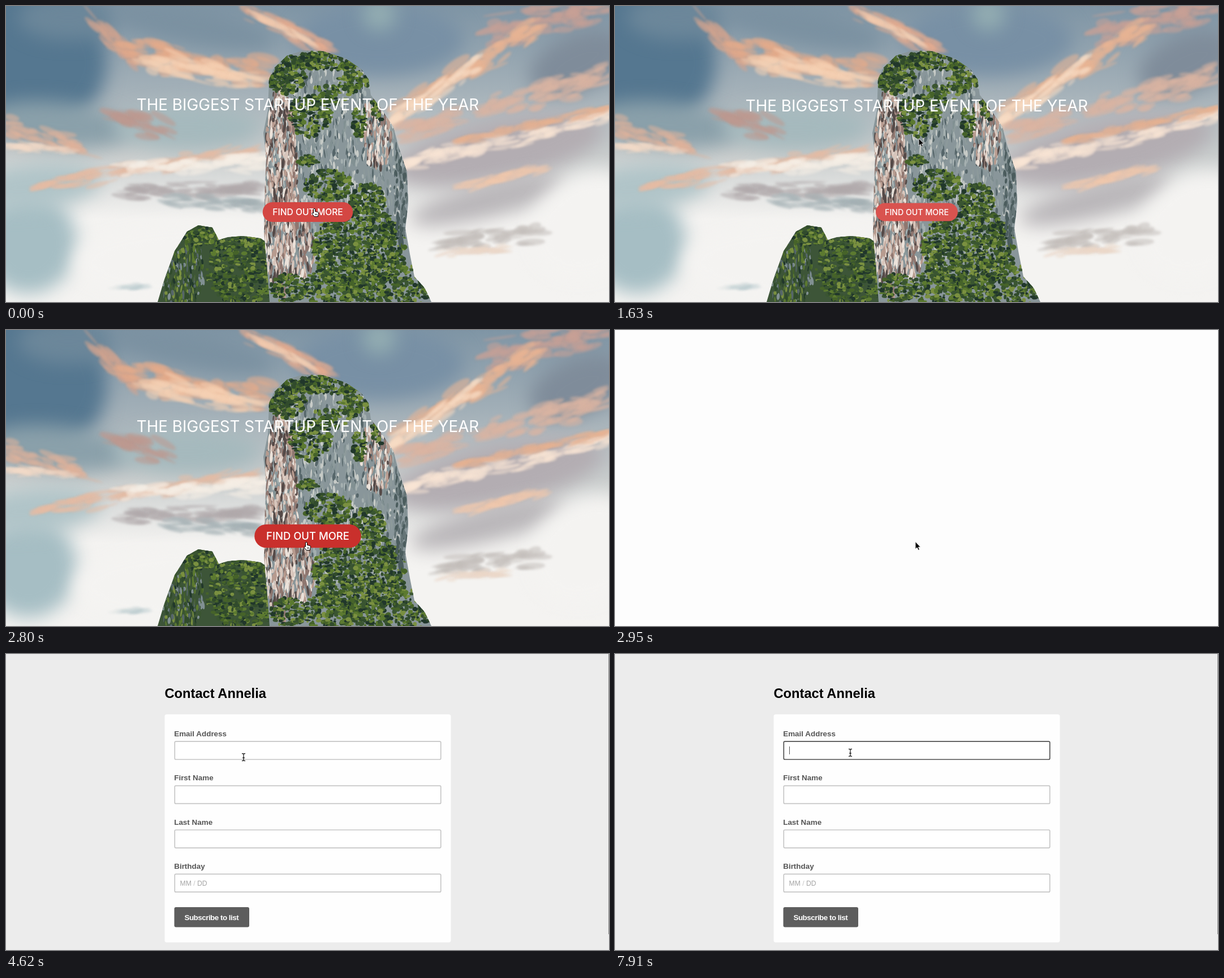
These frames come from a looping animation (1066x525 px, 8 s). An HTML page with a canvas:

```html
<!DOCTYPE html>
<html lang="en">
<head>
<meta charset="utf-8">
<title>Event sign-up</title>
<style>
  html, body { margin: 0; width: 100%; height: 100%; overflow: hidden; background: #fdfdfd; }
  canvas, svg { position: absolute; left: 0; top: 0; width: 1066px; height: 525px; }
  canvas { will-change: transform; }
  .hero { font-family: Inter, sans-serif; fill: #fff; text-anchor: middle; }
  .form { font-family: "Liberation Sans", Arial, sans-serif; }
  .label { font-size: 13.45px; font-weight: 700; fill: #555; }
  .input { fill: #fff; stroke: #c6c6c6; stroke-width: 1.7; }
  .input.focus { stroke: #505050; }
</style>
</head>
<body>
<canvas id="photo" width="1066" height="525"></canvas>
<svg viewBox="0 0 1066 525">
  <g id="hero" class="hero">
    <text id="title" x="533.5" y="186.5" font-size="27.8">THE BIGGEST STARTUP EVENT OF THE YEAR</text>
    <g id="button">
      <rect id="pill" x="-72.5" y="-16" width="145" height="32" rx="16"/>
      <text y="5" font-size="14.2" font-weight="500">FIND OUT MORE</text>
    </g>
  </g>
  <g id="form" class="form">
    <rect width="1066" height="525" fill="#ececec"/>
    <rect x="1065" width="1" height="497" fill="#858585"/>
    <text x="280.5" y="78" font-size="23.7" font-weight="700">Contact Annelia</text>
    <rect x="280.5" y="107" width="506" height="404.5" rx="4" fill="#fefefe"/>
    <g id="fields"></g>
    <text x="307.5" y="410.6" font-size="12.2" fill="#a5a5a5">MM <tspan fill="#c4c4c4">/</tspan> DD</text>
    <rect x="297.5" y="449" width="132.5" height="35.5" rx="3" fill="#5d5d5d"/>
    <text x="315.5" y="471.6" font-size="13.4" font-weight="700" letter-spacing="-.5" fill="#fff">Subscribe to list</text>
    <rect id="caret" x="308" y="164" width="1" height="14" fill="#555"/>
  </g>
  <g id="cursor">
    <path id="arrow" d="M0 0V13L3 10.3L5.2 15L7.3 14L5.2 9.6H9.2Z" fill="#000" stroke="#fff" stroke-width=".8"/>
    <path id="hand" d="M-1.5 8V1.3a1.5 1.5 0 0 1 3 0V5L6 6Q7.8 6.5 7.6 8.5L6.5 12V14H0L-3.6 9.5Q-4.4 7.6-3 7.2ZM2 9V11.5M4 9V11.5" fill="#fff" stroke="#000" stroke-width="1"/>
    <path id="beam" d="M-3-6.5Q0-6.5 0-5Q0-6.5 3-6.5M0-5V5M-3 6.5Q0 6.5 0 5Q0 6.5 3 6.5M-1.8 1H1.8" fill="none" stroke="#222" stroke-width="1.3"/>
  </g>
</svg>
<script>
const start = performance.now();
const LOOP = 8000;
const $ = id => document.getElementById(id);

// ---- Landscape ----
let seed = 41;
const rand = () => {
  seed = (seed + 0x6D2B79F5) | 0;
  let v = Math.imul(seed ^ (seed >>> 15), 1 | seed);
  v ^= v + Math.imul(v ^ (v >>> 7), 61 | v);
  return ((v ^ (v >>> 14)) >>> 0) / 4294967296;
};
const jitter = () => rand() + rand() - 1;
const pick = list => list[Math.floor(rand() * list.length)];
const ctx = $('photo').getContext('2d');

function oval(x, y, rx, ry, turn, color) {
  ctx.fillStyle = color;
  ctx.beginPath();
  ctx.ellipse(x, y, rx, ry, turn, 0, 2 * Math.PI);
  ctx.fill();
}

// Wispy ovals scattered along a line.
function wisp(x0, y0, x1, y1, spread, color) {
  const length = Math.hypot(x1 - x0, y1 - y0);
  const turn = Math.atan2(y1 - y0, x1 - x0);
  for (let i = 0; i < length / 4; i++) {
    const p = rand();
    oval(x0 + (x1 - x0) * p, y0 + (y1 - y0) * p + jitter() * spread,
      8 + rand() * 24, 1 + rand() * spread * .28, turn + jitter() * .3, color);
  }
}

function dabs(areas, colors, w, h) {
  for (const [x, y, rx, ry, count] of areas)
    for (let i = 0; i < count; i++) {
      const a = rand() * 2 * Math.PI, r = Math.sqrt(rand());
      oval(x + Math.cos(a) * r * rx, y + Math.sin(a) * r * ry,
        w * (.4 + rand()), h * (.4 + rand()), jitter() * .3, pick(colors));
    }
}

function outline(points) {
  const path = new Path2D();
  for (const pair of points.split(' ')) path.lineTo(...pair.split(','));
  path.closePath();
  return path;
}

function drawSky() {
  const sky = ctx.createLinearGradient(0, 0, 0, 525);
  [[0, '#7f95a5'], [.28, '#a3b0b8'], [.5, '#c9cdcd'], [.72, '#f4f3f1'], [1, '#f4f3f1']]
    .forEach(stop => sky.addColorStop(...stop));
  ctx.fillStyle = sky;
  ctx.fillRect(0, 0, 1066, 525);

  ctx.filter = 'blur(16px)';
  oval(30, 90, 150, 130, .3, '#557790');
  oval(110, 20, 90, 40, 0, '#6c879a');
  oval(330, 35, 150, 35, .2, '#7b91a1');
  oval(660, 60, 150, 65, 0, '#7890a5');
  oval(660, 15, 30, 28, 0, '#94aeb2');
  oval(1010, 100, 90, 50, -.4, '#7f8c9a');
  oval(90, 210, 130, 40, .1, '#8aa0aa');
  oval(320, 215, 130, 40, 0, '#a5b9bd');
  oval(40, 420, 85, 90, 0, '#a6bec4');
  oval(50, 320, 120, 40, -.1, '#b0c4c8');
  oval(870, 255, 190, 55, -.2, '#b3adb2');
  oval(850, 345, 140, 30, -.25, '#b9b6b9');
  oval(330, 455, 210, 70, 0, '#f4f3f1');
  oval(1030, 390, 110, 90, -.6, '#f4f3f1');

  ctx.filter = 'blur(2px)';
  ctx.globalAlpha = .55;
  [
    [150, 20, 230, 100, 22, '#d4a48f'],
    [200, 70, 460, 120, 34, '#e6ab8b'],
    [240, 95, 450, 135, 22, '#f6d2b5'],
    [420, 5, 575, 82, 18, '#e3ab90'],
    [450, 20, 540, 65, 8, '#f5d0b5'],
    [180, 190, 290, 225, 26, '#bd9a90'],
    [0, 215, 150, 260, 22, '#e0b39b'],
    [0, 248, 110, 255, 10, '#f2dac8'],
    [60, 320, 440, 255, 16, '#e6bca4'],
    [190, 295, 455, 275, 20, '#f6eee6'],
    [200, 328, 450, 325, 16, '#b1aaab'],
    [290, 345, 455, 352, 14, '#a5b1b4'],
    [1066, 5, 850, 45, 30, '#c9a196'],
    [940, 40, 690, 185, 28, '#e9b494'],
    [840, 100, 680, 205, 18, '#f8dcc5'],
    [1066, 120, 700, 225, 26, '#dab4a2'],
    [1066, 195, 705, 280, 17, '#f9e6d6'],
    [1066, 182, 800, 240, 9, '#e8b293'],
    [950, 288, 800, 322, 10, '#f0c9ae'],
    [945, 400, 770, 420, 22, '#c3bdba'],
    [890, 430, 770, 440, 8, '#ecd8c8'],
    [205, 497, 240, 497, 7, '#b9cbce']
  ].forEach(line => wisp(...line));
  ctx.filter = 'none';
  ctx.globalAlpha = 1;
}

const greens = ['#21372b', '#314b2c', '#466329', '#5c7a30', '#7a9040', '#3a5531'];
const grays = ['#56666a', '#819092', '#a5b0b0', '#c7cbc7', '#8d9a9b'];
const pinks = ['#d8c6bc', '#b79b8f', '#8f7770', '#ebe2da', '#554a48'];

function drawRocks() {
  const hill = outline('268,525 280,485 298,435 320,400 340,389 365,393 376,415 392,410 420,408 450,412 470,425 480,525');
  const tower = outline('466,525 462,470 456,400 457,340 460,270 455,225 463,185 465,130 474,110 497,88 525,79 560,80 600,93 628,112 641,130 645,158 665,185 685,215 694,250 709,295 711,350 706,395 714,440 722,480 740,500 752,525');

  ctx.save();
  ctx.clip(hill);
  ctx.fillStyle = '#3d5538';
  ctx.fillRect(260, 380, 230, 150);
  dabs([[310, 470, 40, 70, 260]], grays.slice(0, 2).concat(greens), 2, 6);
  dabs([[345, 405, 35, 20, 120], [420, 465, 65, 65, 600]], greens, 4, 3);
  ctx.restore();

  ctx.save();
  ctx.clip(tower);
  ctx.fillStyle = '#89969a';
  ctx.fillRect(450, 70, 310, 460);
  dabs([[585, 270, 130, 200, 1500]], grays, 1.8, 7);
  dabs([[485, 330, 32, 190, 650], [655, 225, 28, 65, 130], [520, 430, 25, 60, 130]], pinks, 2, 8);
  dabs([
    [495, 120, 36, 36, 260], [575, 97, 70, 17, 240], [615, 125, 28, 28, 130],
    [537, 195, 38, 38, 180], [575, 155, 35, 20, 60], [625, 205, 13, 28, 60],
    [535, 274, 18, 10, 50], [570, 318, 42, 28, 190], [660, 180, 14, 22, 35],
    [640, 350, 32, 35, 170], [625, 430, 82, 75, 900], [670, 500, 85, 50, 550],
    [500, 500, 32, 26, 140], [570, 500, 42, 35, 200]
  ], greens, 4, 3.2);
  dabs([[698, 330, 12, 90, 90]], ['#4b5c5d', '#667577'], 2, 7);
  ctx.restore();
}

drawSky();
drawRocks();

// ---- Form fields ----
$('fields').innerHTML = ['Email Address', 'First Name', 'Last Name', 'Birthday'].map((name, i) => {
  const y = 155.2 + i * 78.4;
  return `<text class="label" x="297.2" y="${y - 9.2}">${name}</text>
    <rect class="input" x="298.3" y="${y}" width="470.4" height="31.8" rx="2"/>`;
}).join('');
const emailBox = document.querySelector('.input');

// ---- Timeline: time, pointer, x, y, button scale ----
const steps = [
  [0, 'hand', 545, 359.5, 1.1],
  [150, 'hand', 545, 359.5, 1.3],
  [900, 'hand', 544, 352, 1.3],
  [1050, 'arrow', 542, 326, 1.2],
  [1200, 'arrow', 540, 290, 1.1],
  [1340, 'arrow', 538, 257, 1],
  [1490, 'arrow', 537, 240, 1],
  [1630, 'arrow', 537, 235, 1],
  [1780, 'arrow', 536, 262, 1],
  [1920, 'arrow', 535, 312, 1],
  [2070, 'hand', 533, 356, 1.1],
  [2210, 'hand', 532, 375, 1.2],
  [2360, 'hand', 531, 378, 1.3],
  [2660, 'hand', 531, 376.5, 1.3],
  [2950, 'arrow', 531, 375.5, 1],
  [4020, 'arrow', 521, 361, 1],
  [4170, 'beam', 492, 322, 1],
  [4320, 'beam', 458, 259, 1],
  [4470, 'arrow', 434, 212, 1],
  [4620, 'beam', 420, 183, 1],
  [4770, 'beam', 416, 175, 1]
];
const FORM_AT = 3390, BLANK_AT = 2950, FOCUS_AT = 4920;
const caretFlips = [4920, 5370, 5820, 6420, 6870, 7310, 7910];

const show = (el, on) => { el.style.display = on ? '' : 'none'; };
const mix = (a, b, p) => Math.round(a + (b - a) * p);

function render(t) {
  const [, pointer, x, y, scale] = steps.findLast(step => step[0] <= t);
  const hover = (scale - 1) / .3;
  show($('photo'), t < BLANK_AT);
  show($('hero'), t < BLANK_AT);
  show($('form'), t >= FORM_AT);

  $('title').setAttribute('y', 186.5 - hover * 6);
  $('button').setAttribute('transform', `translate(533.5 365.5) scale(${scale})`);
  $('pill').setAttribute('fill', `rgb(${mix(217, 201, hover)},${mix(83, 48, hover)},${mix(79, 44, hover)})`);

  emailBox.classList.toggle('focus', t >= FOCUS_AT);
  show($('caret'), caretFlips.filter(at => at <= t).length % 2 === 1);

  $('cursor').setAttribute('transform', `translate(${x} ${y})`);
  for (const id of ['arrow', 'hand', 'beam']) show($(id), id === pointer);
}

function tick() {
  render((performance.now() - start) % LOOP);
  requestAnimationFrame(tick);
}
tick();
</script>
</body>
</html>
```
